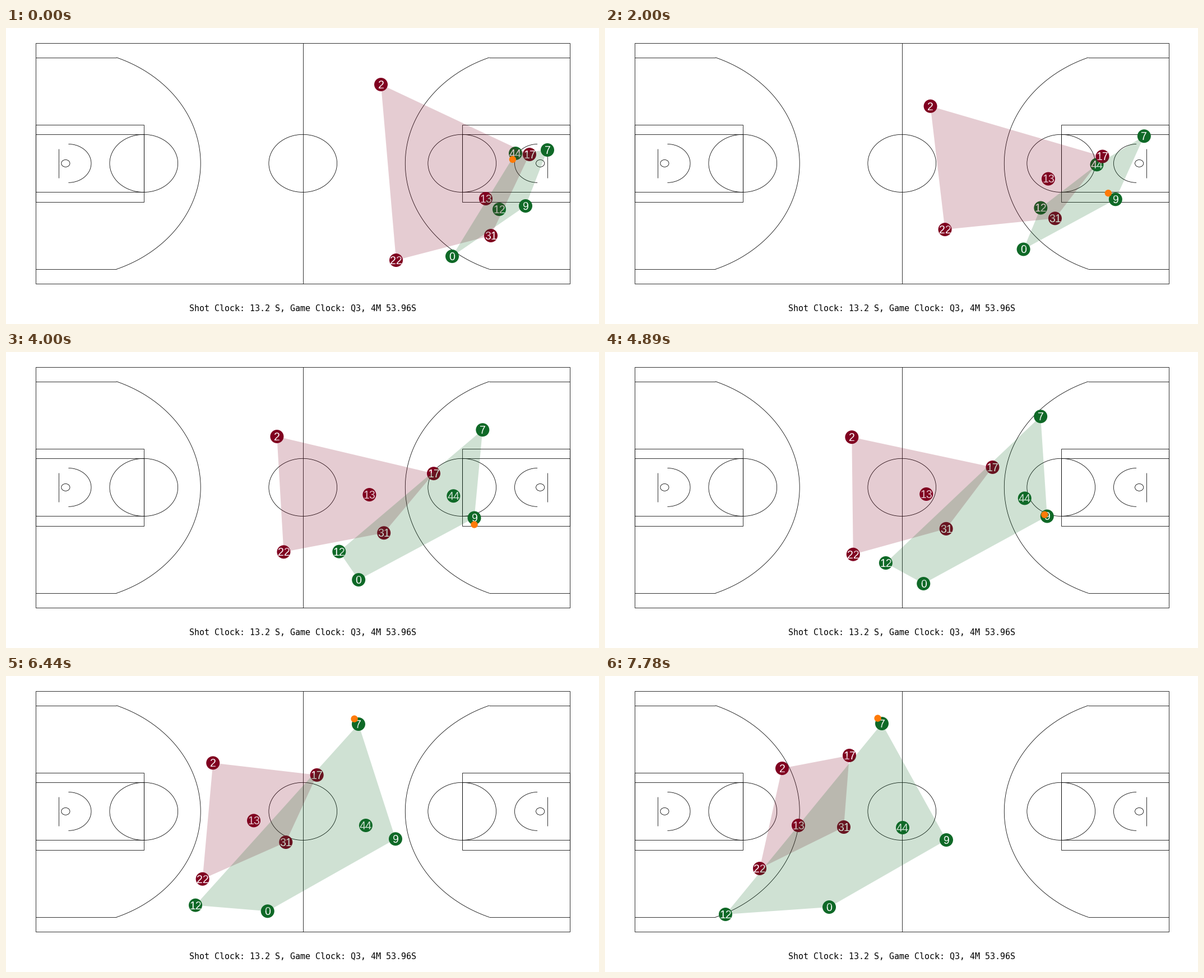
Write a matplotlib script that moves like this. It is 1058x529 px and loops after 8000 ms.

```python
import matplotlib.pyplot as plt
import numpy as np
from matplotlib.animation import FuncAnimation
from matplotlib.patches import Circle, Ellipse, Polygon, Rectangle

W, H, DPI = 1058, 529, 64
PX = 72 / DPI  # one pixel in points
STEPS, LOOP_MS, TICK_MS = 36, 8000, 40
MAROON, GREEN, ORANGE = "#800020", "#0f6927", "#ff7a08"
PLAYER_R, BALL_R = 12, 6.2

# Court origin and scale, in pixels and pixels per foot
LEFT, TOP = 53.1, 26.9
FT_X, FT_Y = 953.3 / 94, 8.6

KEYS = (0, 10, 25, 35)  # steps of the four points on each run


def run(*points):
    """Cubic path through the key points, as a function of the step."""
    fit = np.polyfit(KEYS, np.array(points), 3)
    return lambda step: np.array([np.polyval(c, step) for c in fit.T])


AWAY = {
    "2": run((669, 101), (570, 142), (409, 153), (316, 165)),
    "17": run((934, 226), (877, 229), (634, 195), (436, 142)),
    "13": run((856, 305), (778, 267), (516, 255), (345, 267)),
    "31": run((865, 371), (791, 338), (560, 309), (426, 270)),
    "22": run((696, 415), (595, 358), (403, 364), (276, 344)),
}
HOME = {
    "44": run((909, 224), (871, 246), (706, 264), (531, 271)),
    "7": run((966, 218), (954, 188), (716, 100), (494, 85)),
    "9": run((927, 318), (905, 305), (750, 292), (609, 293)),
    "12": run((880, 324), (760, 324), (430, 392), (215, 426)),
    "0": run((796, 408), (736, 396), (523, 418), (400, 413)),
}


def carried(number, degrees):
    """Ball held at the edge of a player's dot."""
    a = np.radians(degrees)
    hand = PLAYER_R * np.array([np.cos(a), np.sin(a)])
    return lambda step: HOME[number](step) + hand


def ball_at(step):
    """Carried by three players in turn, with straight passes between."""
    first, second, third = carried("44", 115), carried("9", 90), carried("7", 232)
    for giver, taker, start, end in ((first, second, 7, 10),
                                     (second, third, 21.6, 27.6)):
        if step < start:
            return giver(step)
        if step < end:
            u = (step - start) / (end - start)
            return (1 - u) * giver(start) + u * taker(end)
    return third(step)


def hull(points):
    """Convex hull by the monotone chain."""
    def chain(pts):
        out = []
        for p in pts:
            while len(out) > 1:
                a, b = out[-2], out[-1]
                if ((b[0] - a[0]) * (p[1] - a[1])
                        > (b[1] - a[1]) * (p[0] - a[0])):
                    break
                out.pop()
            out.append(p)
        return out[:-1]

    pts = sorted(map(tuple, points))
    return chain(pts) + chain(pts[::-1])


fig = plt.figure(figsize=(W / DPI, H / DPI), dpi=DPI, facecolor="white")
ax = fig.add_axes([0, 0, 1, 1])
ax.set_xlim(0, W)
ax.set_ylim(H, 0)
ax.axis("off")

LINE_W = 0.8 * PX
STROKE = dict(lw=LINE_W, edgecolor="black", fill=False, zorder=1)


def court(x, y):
    return LEFT + x * FT_X, TOP + y * FT_Y


def line(*points):
    ax.plot(*zip(*(court(x, y) for x, y in points)), color="black",
            lw=LINE_W, solid_capstyle="butt", zorder=1)


def box(x0, y0, x1, y1):
    a, b = court(x0, y0), court(x1, y1)
    ax.add_patch(Rectangle(a, b[0] - a[0], b[1] - a[1], **STROKE))


def ring(x, r):
    ax.add_patch(Ellipse(court(x, 25), 2 * r * FT_X, 2 * r * FT_Y, **STROKE))


def arc(x, r, spread, side):
    """Arc around a basket, spread radians either way of the court's axis."""
    a = np.linspace(-spread, spread, 121)
    line(*zip(x + side * r * np.cos(a), 25 + r * np.sin(a)))


def draw_court():
    box(0, 0, 94, 50)
    line((47, 0), (47, 50))
    ring(47, 6)
    spread = np.arcsin(22 / 23.75)
    corner = 5.25 + 23.75 * np.cos(spread)
    for base, side in ((0, 1), (94, -1)):
        def at(d):
            return base + side * d

        for y in (3, 47):
            line((at(0), y), (at(corner), y))
        arc(at(5.25), 23.75, spread, side)
        arc(at(5.75), 4, np.pi / 2, side)
        line((at(4), 22), (at(4), 28))
        ring(at(5.25), 0.75)
        ring(at(19), 6)
        left, right = sorted((at(0), at(19)))
        box(left, 17, right, 33)
        box(left, 19, right, 31)


class Team:
    def __init__(self, roster, color, zorder):
        self.runs = list(roster.values())
        self.dots, self.labels = [], []
        for i, number in enumerate(roster):
            z = 2 + i / 10
            self.dots.append(ax.add_patch(
                Circle((0, 0), PLAYER_R, color=color, lw=0, zorder=z)))
            self.labels.append(ax.text(
                0, 0, number, color="white", family="Liberation Sans",
                size=19.5 * PX, ha="center", va="baseline", zorder=z + 0.05))
        self.area = ax.add_patch(
            Polygon([(0, 0)] * 3, color=color, alpha=0.2, lw=0, zorder=zorder))

    def place(self, step):
        spots = [spot(step) for spot in self.runs]
        for dot, label, (x, y) in zip(self.dots, self.labels, spots):
            dot.center = x, y
            label.set_position((x, y + 6.9))
        self.area.set_xy(hull(spots))


draw_court()
# The tinted areas lie over the players of both teams
teams = [Team(AWAY, MAROON, 4), Team(HOME, GREEN, 5)]
ball = ax.add_patch(Circle((0, 0), BALL_R, color=ORANGE, lw=0, zorder=6))
ax.text(529.8, 505.5, "Shot Clock: 13.2 S, Game Clock: Q3, 4M 53.96S",
        family="DejaVu Sans Mono", size=15 * PX, color="black",
        ha="center", va="baseline")


def update(tick):
    # Positions jump once per step; a step that starts within a tick shows at once
    step = min((tick + 1) * TICK_MS * STEPS // LOOP_MS, STEPS - 1)
    for team in teams:
        team.place(step)
    ball.center = tuple(ball_at(step))
    return []


anim = FuncAnimation(fig, update, frames=LOOP_MS // TICK_MS, interval=TICK_MS,
                     init_func=lambda: update(0), repeat=True, blit=False)
plt.show()
```
